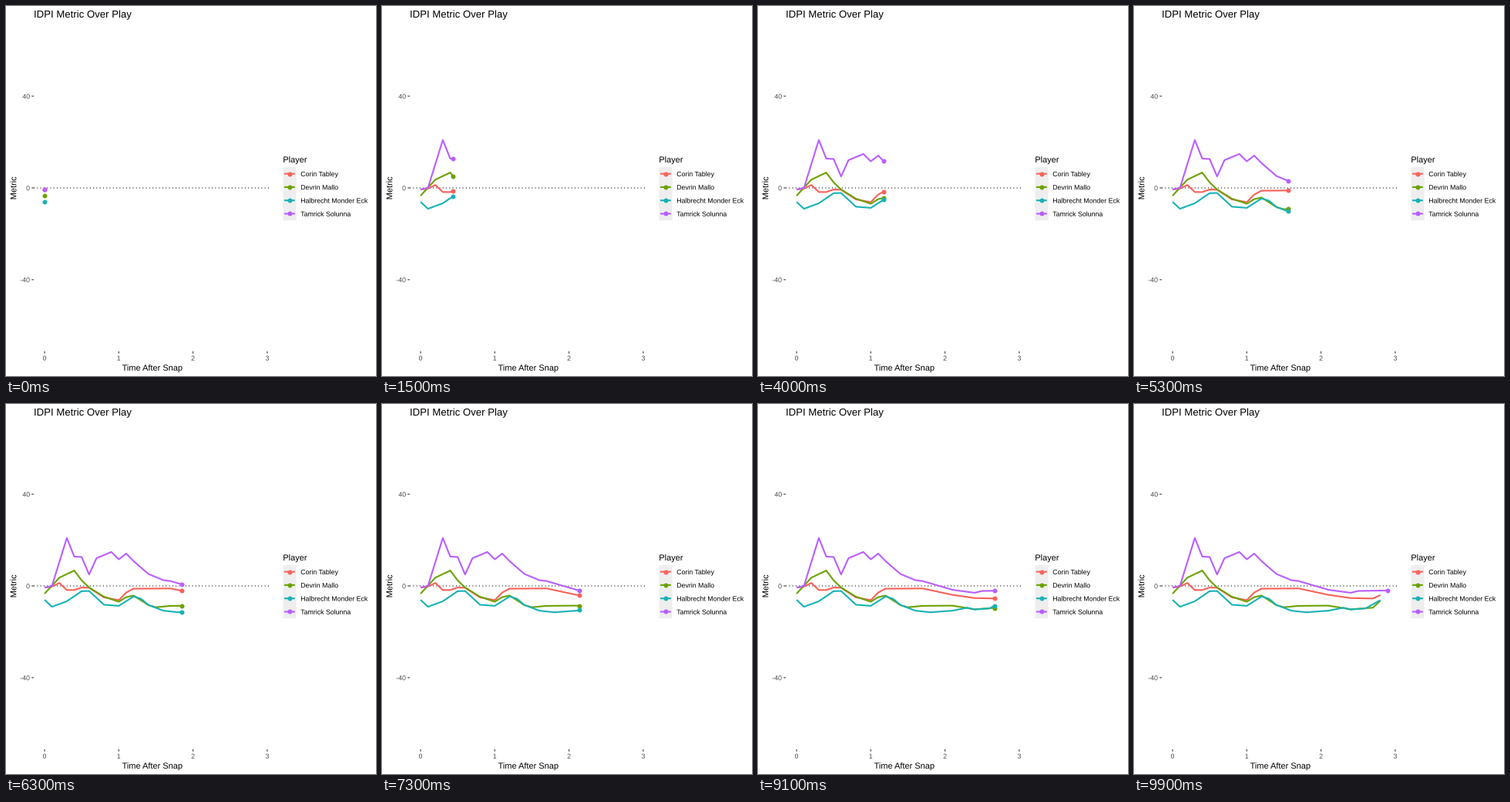
Recreate the animation shown at these times as a matplotlib script. Size 480x480 px, loop 10 s.

```python
import matplotlib.pyplot as plt
import numpy as np
from matplotlib.animation import FuncAnimation
from matplotlib.patches import PathPatch, Rectangle
from matplotlib.textpath import TextPath
from matplotlib.transforms import Affine2D

SIZE, DPI = 480, 72
FRAMES, INTERVAL = 100, 100
T_END = 2.9
LEFT, RIGHT, BOTTOM = 36, 343.2, 448
ZERO_X, ZERO_Y = 50, 236
LINE_W, DOT_D = 2.1, 6
GREY = "#4D4D4D"

plt.rcParams["font.family"] = "Liberation Sans"

# name, colour, turning points {tenths of a second: metric}
PLAYERS = [
    ("Corin Tabley", "#F8625A",
     {0: -.7, 1: -.3, 2: 1.3, 3: -1.8, 4: -1.8, 5: -.7, 6: -.8, 8: -5,
      10: -6.2, 11: -2.9, 12: -1.2, 17: -1.1, 21: -3.9, 24: -5.3,
      27: -5.5, 28: -4}),
    ("Devrin Mallo", "#6CA200",
     {0: -3.4, 2: 3.6, 4: 6.7, 5: 2.4, 6: -.7, 8: -4.7, 10: -6.9,
      11: -4.9, 12: -4.2, 14: -8.4, 15: -9.3, 17: -8.7, 21: -8.6,
      24: -10.2, 27: -9.5, 28: -6.4}),
    ("Halbrecht Monder Eck", "#18B2B7",
     {0: -6.1, 1: -9.1, 3: -6.7, 5: -2.3, 6: -2.2, 8: -8.2, 10: -8.7,
      12: -4.6, 13: -5.6, 14: -8.3, 16: -10.8, 18: -11.5, 21: -10.8,
      23: -9.5, 24: -10.3, 26: -9.8, 28: -6.2}),
    ("Tamrick Solunna", "#B95EFF",
     {0: -.7, 1: 0, 3: 20.9, 4: 12.8, 5: 12.6, 6: 5, 7: 12.1, 9: 14.8,
      10: 11.6, 11: 14.1, 12: 10.8, 14: 5.2, 16: 2.5, 17: 2.1, 21: -1.7,
      24: -3, 25: -2.2, 29: -2}),
]


def px(t):
    return ZERO_X + 96.3 * np.asarray(t)


def py(v):
    return ZERO_Y - 2.975 * np.asarray(v)


fig = plt.figure(figsize=(SIZE / DPI, SIZE / DPI), dpi=DPI, facecolor="white")
ax = fig.add_axes([0, 0, 1, 1])
ax.set(xlim=(0, SIZE), ylim=(SIZE, 0))
ax.axis("off")


def label(x, y, s, size, color="black", align=0, angle=0):
    """Text on a baseline; align 0, 0.5 or 1 is left, centre or right."""
    path = TextPath((0, 0), s, size=size)
    box = path.get_extents()
    place = (Affine2D().translate(-align * (box.x0 + box.x1), 0)
             .scale(1, -1).rotate_deg(-angle).translate(x, y))
    ax.add_patch(PathPatch(place.transform_path(path), fc=color, lw=0, snap=False))


def stroke(xs, ys, color, width, **kw):
    return ax.plot(xs, ys, color=color, lw=width, snap=False,
                   solid_capstyle="butt", solid_joinstyle="round", **kw)[0]


def dot(x, y, color, z):
    return ax.plot([x], [y], "o", ms=DOT_D, mew=0, color=color,
                   snap=False, zorder=z)[0]


# Titles and axes
label(36, 15, "IDPI Metric Over Play", 13.2)
label(189.7, 473, "Time After Snap", 11, align=0.5)
label(13.3, ZERO_Y, "Metric", 11, align=0.5, angle=90)
for v in (-40, 0, 40):
    y = float(py(v))
    stroke([LEFT - 2.75, LEFT], [y, y], "#333333", 1.07)
    label(31, y + 3.3, str(v), 8.8, GREY, align=1)
for t in range(4):
    x = float(px(t))
    stroke([x, x], [BOTTOM, BOTTOM + 2.75], "#333333", 1.07)
    label(x, 459.8, str(t), 8.8, GREY, align=0.5)
stroke([LEFT, RIGHT], [ZERO_Y, ZERO_Y], "black", 1.07,
       ls=(0, (1, 3)), dash_capstyle="butt", zorder=1.5)

# Legend
KEY_X, KEY_Y, KEY = 359.3, 209, 17.28
label(KEY_X, 203, "Player", 11)
ax.add_patch(Rectangle((KEY_X, KEY_Y), KEY, KEY * len(PLAYERS),
                       fc="#EEEEEE", lw=0, snap=False))
for k, (name, color, _) in enumerate(PLAYERS):
    y = KEY_Y + KEY * (k + 0.5)
    stroke([KEY_X + 0.1 * KEY, KEY_X + 0.9 * KEY], [y, y], color, LINE_W)
    dot(KEY_X + KEY / 2, y, color, 3)
    label(382.2, y + 3.3, name, 8.8)

tracks = []
for k, (_, color, turns) in enumerate(PLAYERS):
    times = np.array(list(turns)) / 10
    line = stroke([], [], color, LINE_W, zorder=4 + k / 10)
    tracks.append((times, np.array(list(turns.values())), line,
                   dot(0, 0, color, 5 + k / 10)))


def draw(i):
    now = T_END * i / (FRAMES - 1)
    for times, vals, line, head in tracks:
        end = min(now, times[-1])
        past = times < end
        ts = np.append(times[past], end)
        vs = np.append(vals[past], np.interp(end, times, vals))
        line.set_data(px(ts), py(vs))
        head.set_data([px(end)], [py(vs[-1])])
        head.set_visible(now <= times[-1] + 1e-6)
    return [a for track in tracks for a in track[2:]]


anim = FuncAnimation(fig, draw, frames=FRAMES, interval=INTERVAL,
                     init_func=lambda: draw(0), repeat=True, repeat_delay=0)
plt.show()
```
